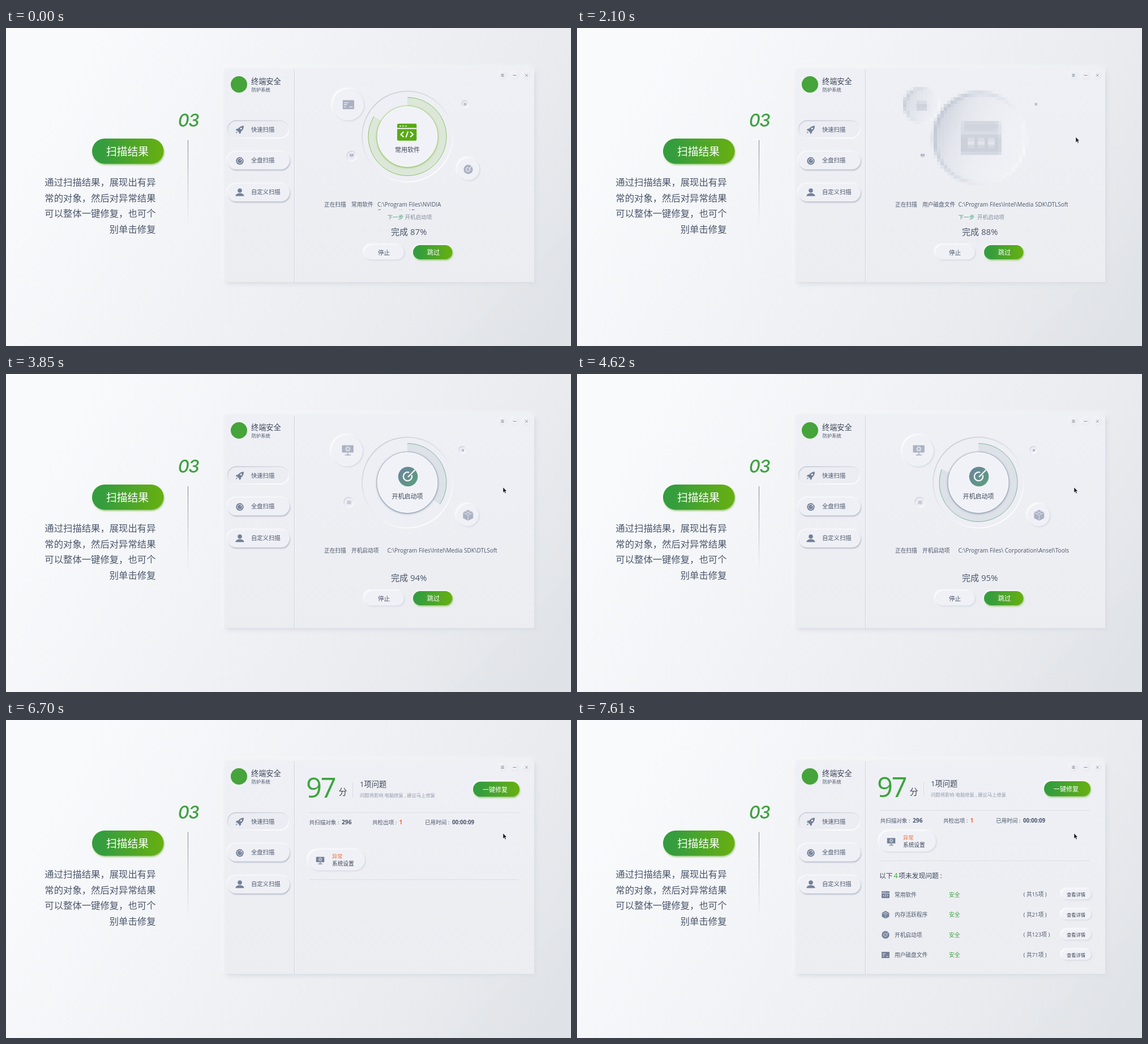
Recreate the animation shown at these times as an HTML page with a canvas. Size 998 px wide and 561 px high, loop 8 s.

```html
<!DOCTYPE html>
<html lang="zh-CN">
<head>
<meta charset="utf-8">
<title>扫描结果</title>
<style>
html, body { margin: 0; width: 100%; height: 100%; overflow: hidden; background: #eef0f3; }
svg, canvas { position: absolute; display: block; }
#stage { left: 0; top: 0; width: 998px; height: 561px; }
#mosaic { left: 570px; top: 98px; width: 234px; height: 186px; image-rendering: pixelated; animation: mosaic 8s linear infinite; }
text { font-family: "Open Sans", "Noto Sans CJK SC", "Noto Sans CJK", sans-serif; fill: #4b576c; white-space: pre; }
.cjk { font-family: "Noto Sans CJK SC", "Noto Sans CJK", sans-serif; }
.mid { text-anchor: middle; }
.end { text-anchor: end; }
.white { fill: #fff; }
.dark { fill: #3c4659; }
.pale { fill: #929cae; }
.green { fill: #3ba53c; }
.orange { fill: #ee6b35; }
.bold { font-weight: 700; }
.up { fill: #f0f1f6; filter: drop-shadow(1.5px 1.5px 1.5px #cbd0db) drop-shadow(-1.5px -1.5px 1.5px #fff); }
.flat { fill: #eff0f5; filter: drop-shadow(.8px .8px .8px #cdd2dc) drop-shadow(-.8px -.8px .8px #fff); }
.hard { fill: #eff0f5; filter: drop-shadow(1px 2px .8px #b4bbca) drop-shadow(-1px -1px 1.5px #fff); }
.pit { fill: #ecedf3; stroke: url(#rim); stroke-width: 1.6; }
.go { fill: url(#leaf); filter: drop-shadow(1.5px 2px 1.5px #9cc67f) drop-shadow(-1px -1px 1.5px #fff); }
.rule { stroke: #dadde5; stroke-width: 1; }
.ico { color: #748098; }
.soft { color: #aab1c2; }
#scan { animation: leave 8s linear infinite; }
#result { animation: enter 8s linear infinite; }
#ringA, #discsA { animation: fadeA 8s linear infinite; }
#dotsA { animation: dotsA 8s linear infinite; }
#ringB { transform-origin: 709px 191.5px; animation: grow 8s linear infinite; }
#ringB .face { animation: face 8s linear infinite; }
#discsB circle { transform-box: fill-box; transform-origin: center; animation: pop 8s linear infinite; }
#iconsB { animation: iconsB 8s linear infinite; }
#pointer { animation: pointer 8s linear infinite; }
@keyframes leave { 0%, 81.1% { opacity: 1; } 82.6%, 100% { opacity: 0; } }
@keyframes enter { 0%, 81.1% { opacity: 0; } 83.5%, 100% { opacity: 1; } }
@keyframes fadeA { 0%, 21.8% { opacity: 1; } 24.8%, 100% { opacity: 0; } }
@keyframes dotsA { 0%, 26.4% { opacity: 1; } 28%, 100% { opacity: 0; } }
@keyframes mosaic { 0%, 22.6% { opacity: 0; } 25%, 27% { opacity: 1; } 30.6%, 100% { opacity: 0; } }
@keyframes pop { 0%, 28% { transform: scale(0); animation-timing-function: ease-out; } 31.5%, 100% { transform: scale(1); } }
@keyframes iconsB { 0%, 32.3% { opacity: 0; } 38.5%, 100% { opacity: 1; } }
@keyframes grow {
  0%, 40.2% { opacity: 0; transform: scale(.48); }
  40.21% { opacity: .7; transform: scale(.48); animation-timing-function: ease-out; }
  44%, 100% { opacity: 1; transform: scale(1); }
}
@keyframes face { 0%, 43% { opacity: 0; } 47%, 100% { opacity: 1; } }
@keyframes pointer {
  0%, 5.2% { opacity: 0; transform: translate(895px, 86px); }
  5.21% { opacity: 1; transform: translate(895px, 86px); animation-timing-function: ease-in-out; }
  10.4%, 30% { opacity: 1; transform: translate(881px, 192.5px); animation-timing-function: ease-in-out; }
  35%, 100% { opacity: 1; transform: translate(878px, 200px); }
}
</style>
</head>
<body>
<svg id="stage" viewBox="0 0 998 561">
  <defs>
    <linearGradient id="sky" gradientUnits="userSpaceOnUse" x1="120" y1="60" x2="960" y2="540">
      <stop offset="0" stop-color="#f9fafc"/><stop offset=".4" stop-color="#f1f2f5"/>
      <stop offset=".75" stop-color="#e9ebef"/><stop offset="1" stop-color="#e0e3e7"/>
    </linearGradient>
    <linearGradient id="leaf"><stop offset=".15" stop-color="#359d3d"/><stop offset="1" stop-color="#68b011"/></linearGradient>
    <linearGradient id="teal" x2="1" y2="1"><stop stop-color="#6d829f"/><stop offset="1" stop-color="#57a07a"/></linearGradient>
    <linearGradient id="rim" x2=".6" y2="1"><stop stop-color="#bcc2cf"/><stop offset=".55" stop-color="#e4e6ed"/><stop offset="1" stop-color="#fff"/></linearGradient>
    <linearGradient id="wall" y2="1" x2="0"><stop stop-color="#eff0f5"/><stop offset="1" stop-color="#ecedf1"/></linearGradient>
    <linearGradient id="thread" gradientUnits="userSpaceOnUse" x1="0" x2="0" y1="198" y2="348"><stop stop-color="#7b8492"/><stop offset="1" stop-color="#7b8492" stop-opacity="0"/></linearGradient>
    <clipPath id="pane"><path d="M511 73h422v375H511z"/></clipPath>
    <clipPath id="line"><path d="M650 300h280v21.2H650z"/></clipPath>

    <symbol id="code" viewBox="0 0 24 24">
      <rect x="0" y="1.5" width="24" height="21" rx="2" fill="currentColor"/>
      <path d="M0 7.5h24M3 4.5h1.6M6.5 4.5h1.6M10 4.5h1.6M8 11.5l-3.5 3.3L8 18M16 11.5l3.5 3.3L16 18M13.3 11l-2.6 7.5" fill="none" stroke="#f2f4f6" stroke-width="1.5"/>
    </symbol>
    <symbol id="disk" viewBox="0 0 24 24">
      <rect x="0" y="2.5" width="24" height="19" rx="1.5" fill="currentColor"/>
      <path d="M3 8h9M3 12h6M3 16.5h4M14 16.5h7" stroke="#eef0f5" stroke-width="1.5"/>
    </symbol>
    <symbol id="gauge" viewBox="0 0 24 24">
      <circle cx="12" cy="12" r="11.5" fill="currentColor"/>
      <path d="M16.5 10a5.2 5.2 0 1 1-3-3M12 12.5l8.5-8.5" fill="none" stroke="#f2f4f6" stroke-width="1.6"/>
    </symbol>
    <symbol id="cube" viewBox="0 0 24 24">
      <path d="M12 0l11 5.8v12.4L12 24 1 18.2V5.8z" fill="currentColor"/>
      <path d="M1 6l11 6 11-6M12 12v12M6.5 3l11 6M17.5 3l-11 6" fill="none" stroke="#eef0f5" stroke-width="1"/>
    </symbol>
    <symbol id="monitor" viewBox="0 0 24 24">
      <path d="M0 2h24v15H0zM11 17h2v4h5v2H6v-2h5z" fill="currentColor"/>
      <circle cx="12" cy="9.5" r="3.2" fill="none" stroke="#eef0f5" stroke-width="1.5"/>
      <circle cx="12" cy="9.5" r="5" fill="none" stroke="#eef0f5" stroke-width="1.5" stroke-dasharray="1.6 2.33"/>
    </symbol>
  </defs>

  <path d="M0 0h998v561H0z" fill="url(#sky)"/>
  <path d="M998 352v209H790z" fill="#dce0e4" opacity=".2"/>

  <!-- caption -->
  <text x="322" y="173.8" class="mid" style="font:italic 500 31px Inter,sans-serif;fill:#3fa142;letter-spacing:-1.5px">03</text>
  <path d="M321.5 198v150" stroke="url(#thread)"/>
  <rect class="go" x="152" y="195" width="126.5" height="44.5" rx="22.2"/>
  <text x="214.5" y="225" font-size="18.8" class="cjk mid white">扫描结果</text>
  <g font-size="16.35">
    <text class="cjk end" x="264.5" y="278.3">通过扫描结果，展现出有异</text>
    <text class="cjk end" x="264.5" y="305.8">常的对象，然后对异常结果</text>
    <text class="cjk end" x="264.5" y="333.2">可以整体一键修复，也可个</text>
    <text class="cjk end" x="264.5" y="360.5">别单击修复</text>
  </g>

  <!-- window -->
  <path d="M386 72h547v376H386z" fill="url(#wall)" style="filter:drop-shadow(3px 3px 4px #d3d7df) drop-shadow(-3px -3px 4px #f8f9fb)"/>
  <path d="M509.5 73v375" stroke="#ccd0d9"/><path d="M510.5 73v375" stroke="#f8f9fb"/>
  <circle cx="411.5" cy="99.5" r="14.5" fill="#45a43a"/>
  <text x="433" y="98.8" font-size="13.2" class="cjk dark">终端安全</text>
  <text x="433.7" y="112" font-size="8.3" class="cjk">防护系统</text>

  <rect class="pit" x="391.5" y="163.5" width="108" height="30.5" rx="15.2"/>
  <rect class="hard" x="391" y="218" width="110" height="31.5" rx="15.7"/>
  <rect class="hard" x="391" y="274.5" width="110" height="31.5" rx="15.7"/>
  <g font-size="10.3">
    <text x="433" y="182.9" class="cjk">快速扫描</text>
    <text x="433" y="237.2" class="cjk">全盘扫描</text>
    <text x="433" y="293.2" class="cjk">自定义扫描</text>
  </g>
  <g fill="#748098">
    <path d="M420 172.5c-4.500 0-8 2.300-9.800 5l-2.800.3-1.800 2.700 2.700.4 3.500 3.500.4 2.700 2.700-1.800.3-2.800c2.900-1.800 4.900-5 4.800-10zM407.500 182.500l-2 3.500 3.500-2z"/>
    <circle cx="415.300" cy="177.300" r="1.600" fill="#eceef3"/>
    <circle cx="413" cy="234.500" r="6.700"/>
    <circle cx="413" cy="234.500" r="4.300" fill="none" stroke="#eff0f5"/>
    <path d="M413 234.500l5.500-5.500M408 227l-2 2M418 227l2 2" stroke="#eff0f5"/>
    <circle cx="413" cy="286.800" r="3.800"/>
    <path d="M405.500 296.500c0-3.500 3-4 5.500-5h4c2.500 1 5.500 1.500 5.500 5z"/>
  </g>
  <g class="flat"><circle cx="877" cy="83.5" r="6"/><circle cx="898.5" cy="83.5" r="6"/><circle cx="919.5" cy="83.5" r="6"/></g>
  <path d="M874.5 81.5h5M874.5 83.5h5M874.5 85.5h5M895.5 83.5h6M917.2 81.2l4.6 4.6M921.8 81.2l-4.6 4.6" stroke="#6b7589" stroke-width=".8"/>

  <g id="scan">
    <g id="discsA">
      <circle class="up" cx="604.5" cy="135.5" r="27.5"/>
      <circle class="up" cx="816.5" cy="249" r="19.5"/>
      <circle class="pit" cx="811" cy="134" r="6"/>
      <circle class="pit" cx="610.5" cy="226" r="8.5"/>
      <use href="#disk" class="soft" x="594.5" y="125" width="20.5" height="20.5"/>
      <use href="#gauge" class="soft" x="808" y="241" width="17" height="17"/>
    </g>
    <g id="dotsA" class="soft">
      <use href="#gauge" x="808.3" y="132" width="5" height="5"/>
      <use href="#monitor" x="607" y="221.5" width="7" height="7"/>
    </g>
    <g id="discsB">
      <circle class="up" cx="602.5" cy="135.5" r="27.5"/>
      <circle class="up" cx="815.5" cy="249" r="19.5"/>
      <circle class="pit" cx="806" cy="134" r="6"/>
      <circle class="pit" cx="605.5" cy="226" r="8.5"/>
    </g>
    <g id="iconsB" class="soft">
      <use href="#monitor" x="593.5" y="124" width="20.5" height="20.5"/>
      <use href="#cube" x="806.5" y="239.5" width="19.5" height="19.5"/>
      <circle cx="807" cy="134.5" r="2" fill="currentColor"/>
      <path d="M602.5 223.5h7v6h-7z" fill="#c5cad6"/>
    </g>
    <g id="rings"></g>

    <text x="562" y="315" font-size="9.7" class="cjk">正在扫描</text>
    <text x="610" y="315" font-size="9.7" class="cjk" id="kind"></text>
    <g clip-path="url(#line)" font-size="10"><text y="315" id="path1"></text><text y="327.5" id="path2"></text></g>
    <g id="next" font-size="9.6">
      <text x="673.5" y="337" class="cjk" style="fill:#45a077">下一步</text>
      <text y="337" class="cjk" style="fill:#818b9f" id="nextName">开机启动项</text>
    </g>
    <text x="680" y="364.6" font-size="15" id="percent"></text>
    <rect class="up" x="633" y="383" width="70" height="25.5" rx="12.7"/>
    <text x="667.5" y="400.2" font-size="10.6" class="cjk mid">停止</text>
    <rect class="go" x="719" y="383" width="69.5" height="25" rx="12.5"/>
    <text x="755" y="400.2" font-size="11.2" class="cjk mid white">跳过</text>
  </g>

  <g clip-path="url(#pane)"><g id="result">
    <g data-k="-7">
      <text x="530" y="136" font-size="49" class="green" letter-spacing="-2.5">97</text>
      <text x="587.5" y="131.5" font-size="15" class="cjk dark">分</text>
      <path class="rule" d="M612.5 109v27"/>
      <text x="625" y="117" font-size="13.2" class="dark">1项问题</text>
      <text x="625" y="135.2" font-size="8.35" class="cjk pale">问题将影响 电脑修复 , 建议马上修复</text>
      <rect class="go" x="825" y="108" width="82" height="26.5" rx="13.2"/>
      <text x="864" y="126.2" font-size="11.1" class="cjk mid white">一键修复</text>
    </g>
    <g data-k="-6" font-size="9.6">
      <path class="rule" d="M535 159.5h371"/>
      <text x="535.5" y="180.7">共扫描对象 :</text><text x="593" y="180.7" class="bold" font-size="10.2">296</text>
      <text x="647" y="180.7">共检出项 :</text><text x="694.5" y="180.7" class="bold orange" font-size="10.2">1</text>
      <text x="740" y="180.7">已用时间 :</text><text x="788" y="180.7" class="bold" font-size="9.8">00:00:09</text>
    </g>
    <g data-k="-4.5">
      <rect class="up" x="534" y="196" width="100" height="36" rx="18"/>
      <use href="#monitor" class="ico" x="547.5" y="207" width="15" height="15"/>
      <text x="576" y="210.5" font-size="9.2" class="cjk orange">异常</text>
      <text x="576" y="223.9" font-size="9.7" class="cjk dark">系统设置</text>
      <path class="rule" d="M535 248.5h371"/>
    </g>
    <g data-k="-2" font-size="11.8">
      <text x="534" y="278.7" class="cjk dark">以下</text><text x="559.5" y="278.7" class="green" font-size="12.5">4</text>
      <text x="568" y="278.7" class="cjk dark">项未发现问题 :</text>
    </g>
  </g></g>

  <path id="pointer" d="M0 0v9.2l2.2-1.900 1.500 3.500 1.500-.7-1.500-3.300 2.700-.2z" fill="#171b22" stroke="#fff" stroke-width=".4"/>
</svg>
<canvas id="mosaic" width="39" height="31"></canvas>

<script>
const LOOP = 8000;
const $ = id => document.getElementById(id);
const clamp = x => Math.min(1, Math.max(0, x));

function ring(id, c, label, labelY, icon) {
  const arc = 'cx="709" cy="191.5" fill="none" pathLength="360" transform="rotate(-90 709 191.5)"';
  return `<g id="${id}">
    <circle class="pit" cx="709" cy="191.5" r="80" style="fill:#eeeff4"/>
    <circle class="arc" ${arc} r="61" stroke="${c.band}" stroke-width="16"/>
    <circle class="arc" ${arc} r="69" stroke="${c.edge}" stroke-width="1"/>
    <circle cx="709" cy="191.5" r="53" fill="#f1f2f7" stroke="#fff" style="filter:drop-shadow(0 0 1.5px ${c.glow}) drop-shadow(0 1px 1.5px ${c.glow})"/>
    <g class="face">${icon}<text class="cjk mid dark" x="709" y="${labelY}" font-size="11">${label}</text></g>
  </g>`;
}
$('rings').innerHTML =
  ring('ringA', { band: '#dce7d9', edge: '#8cc463', glow: '#96c46a' }, '常用软件', 218.5,
    '<use href="#code" x="691" y="166.5" width="34.5" height="34.5" style="color:#58aa14"/>') +
  ring('ringB', { band: '#dde1e8', edge: '#83b5a4', glow: '#8a9bae' }, '开机启动项', 220,
    '<circle cx="710" cy="181" r="17.3" fill="url(#teal)"/><use href="#gauge" x="692.5" y="163.5" width="35" height="35" style="color:transparent"/>');

const rows = [
  ['code', '常用软件', 15, 308], ['cube', '内存活跃程序', 21, 343.5],
  ['gauge', '开机启动项', 123, 379], ['disk', '用户磁盘文件', 71, 414.5],
];
$('result').insertAdjacentHTML('beforeend', rows.map(([icon, name, count, y], k) => `
  <g data-k="${k}" font-size="9.7">
    <use href="#${icon}" class="ico" x="538" y="${y - 7}" width="14" height="14"/>
    <text class="cjk" x="561" y="${y + 3.6}">${name}</text>
    <text class="cjk green" x="657" y="${y + 3.6}">安全</text>
    <text x="788.5" y="${y + 3.4}">( 共${count}项 )</text>
    <rect class="up" x="856" y="${y - 9}" width="52" height="17.5" rx="8.7"/>
    <text class="cjk mid dark" x="881.5" y="${y + 3}" font-size="8.3" font-weight="500">查看详情</text>
  </g>`).join(''));

// start time, category, path, wrapped rest
const raw = String.raw;
const paths = [
  [0, '常用软件', raw`C:\Program Files\NVIDIA`, raw`Corporation\Drs`],
  [420, '常用软件', raw`C:\Program Files\Internet Explorer\images`],
  [1050, '常用软件', raw`C:\Program Files\Common Files\system\Tools`],
  [1960, '用户磁盘文件', raw`C:\Program Files\Intel\Media SDK\DTLSoft`],
  [2660, '开机启动项', raw`C:\Program Files\Internet Explorer\images`],
  [3640, '开机启动项', raw`C:\Program Files\Intel\Media SDK\DTLSoft`],
  [4270, '开机启动项', raw`C:\Program Files\ Corporation\Ansel\Tools`],
  [5660, '开机启动项', raw`C:\Program Files\Common Files\system\Tools`],
  [5790, '开机启动项', raw`D:\keyshot_w64\kS6\resource location\Scenes`],
  [6290, '开机启动项', raw`D:\keyshot_w64\kS6\resource location\KeyShot`, '6'],
];

function percentAt(t) {
  if (t < 420) return 87;
  if (t < 2310) return 88;
  if (t < 3290) return 89;
  if (t < 5040) return Math.min(95, 90 + Math.floor((t - 3290) / 130));
  return 96;
}

// embossed shapes, drawn small and enlarged into blocks
function drawMosaic() {
  const g = $('mosaic').getContext('2d');
  const disc = (x, y, r, ...colors) => {
    const s = g.createLinearGradient(x - r, y - r * .4, x + r, y + r * .4);
    colors.forEach((c, i) => s.addColorStop(i / (colors.length - 1), c));
    g.fillStyle = s;
    g.beginPath();
    g.arc(x, y, r, 0, 7);
    g.fill();
  };
  const box = (c, x, y, w, h) => { g.fillStyle = c; g.fillRect(x, y, w, h); };
  g.scale(1 / 6, 1 / 6);
  g.translate(-570, -98);
  disc(608, 136, 32, '#c3c9d5', '#dfe2e9', '#fff');
  disc(610, 137, 28, '#d9dde5', '#e8eaf0', '#eff0f5');
  disc(711, 194, 83, '#c0c7d3', '#dadee6', '#fff');
  disc(713, 195, 78, '#cfd4de', '#e3e6ec', '#ebedf2', '#eff0f5', '#eff1f5');
  box('#cdd2dc', 599, 131, 20, 14);
  box('#d8dce4', 678, 166, 70, 58);
  box('#cfd4dd', 684, 166, 58, 14);
  box('#cbd0da', 678, 190, 70, 30);
  [690, 708, 726].forEach(x => box('#e1e4ea', x, 196, 12, 12));
}

const slides = [...document.querySelectorAll('[data-k]')];
const setArc = (id, deg) => document.querySelectorAll(`#${id} .arc`).forEach(a => {
  a.setAttribute('stroke-dasharray', deg >= 360 ? 'none' : `${deg} 400`);
});

function render(t) {
  const [, kind, head, tail = ''] = paths.findLast(p => p[0] <= t);
  const x = kind.length > 4 ? 673.5 : 656;
  $('kind').textContent = kind;
  $('path1').textContent = head;
  $('path2').textContent = tail;
  $('path1').setAttribute('x', x);
  $('path2').setAttribute('x', x);
  $('percent').textContent = `完成 ${percentAt(t)}%`;
  $('next').style.display = t < 2870 ? '' : 'none';
  $('nextName').setAttribute('x', t < 1960 ? 704.5 : 707);

  setArc('ringA', 301 + 59 * clamp(t / 1400));
  setArc('ringB', 360 * (1 - (1 - clamp((t - 3430) / 1960)) ** 1.75));

  // each block settles 70 ms after the one above it
  for (const s of slides) {
    const dy = Math.min(400, 16 * Math.exp((7050 + 70 * s.dataset.k - t) / 48));
    s.setAttribute('transform', `translate(0 ${dy.toFixed(2)})`);
  }
}

let start;
function tick(now) {
  start ??= now;
  render((now - start) % LOOP);
  requestAnimationFrame(tick);
}
drawMosaic();
render(0);
requestAnimationFrame(tick);
</script>
</body>
</html>
```
